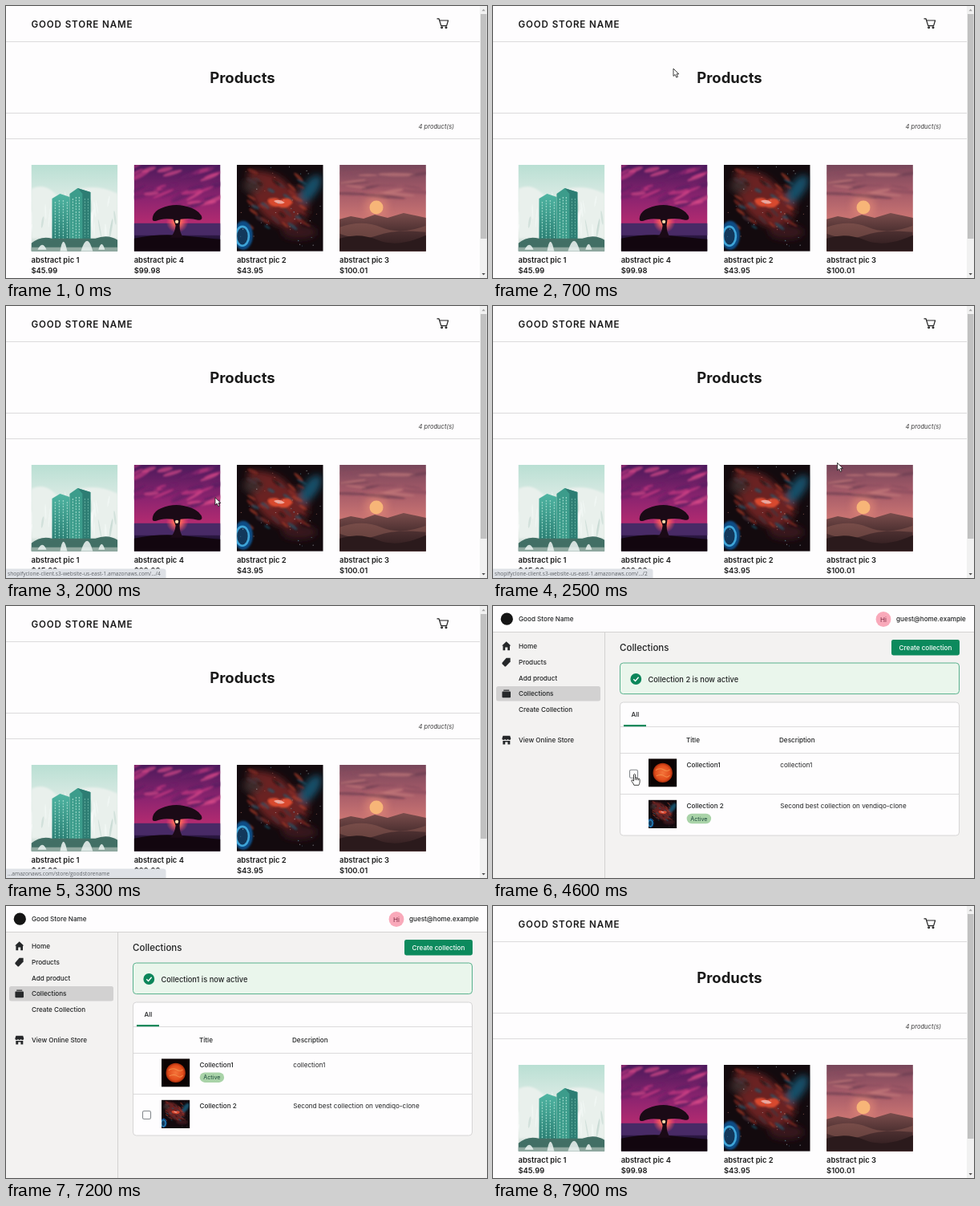
These frames come from a looping animation (600 px wide and 339 px high, 8000 ms). An HTML page:

```html
<!DOCTYPE html>
<html lang="en">
<head>
<meta charset="utf-8">
<title>Store and collections</title>
<style>
html, body { margin: 0; width: 100%; height: 100%; overflow: hidden; background: #fefdfe; }
svg#stage { display: block; width: 100vw; height: 100vh; }
text { font: 400 8.15px Inter, sans-serif; fill: #202223; white-space: pre; }
.m text, text.m { font-weight: 500; }
.shop { font-weight: 600; font-size: 9.4px; fill: #1a1a1a; }
#linkText { font: 6.65px "Open Sans", sans-serif; fill: #5f6368; }
.line { stroke: #dcdbdc; fill: none; }
.off { display: none; }
</style>
</head>
<body>
<svg id="stage" viewBox="0 0 600 339" preserveAspectRatio="none">
<defs>
  <linearGradient id="mint" x2="0" y2="1"><stop stop-color="#b9dfd3"/><stop offset=".4" stop-color="#dcebe5"/><stop offset="1" stop-color="#d3ded8"/></linearGradient>
  <linearGradient id="tower" x2="0" y2="1"><stop stop-color="#4fb5a2"/><stop offset="1" stop-color="#2b7f74"/></linearGradient>
  <linearGradient id="violet" x2="0" y2="1"><stop stop-color="#4b1a5b"/><stop offset=".4" stop-color="#8e2470"/><stop offset=".68" stop-color="#b32b70"/><stop offset=".69" stop-color="#4a2a68"/><stop offset=".85" stop-color="#25143a"/><stop offset="1" stop-color="#12081a"/></linearGradient>
  <linearGradient id="dusk" x2="0" y2="1"><stop stop-color="#77465a"/><stop offset=".3" stop-color="#a35a68"/><stop offset=".6" stop-color="#c87372"/></linearGradient>
  <linearGradient id="land" x2="0" y2="1"><stop stop-color="#7a4d4c"/><stop offset=".5" stop-color="#4b2f30"/><stop offset="1" stop-color="#2a191b"/></linearGradient>
  <radialGradient id="glow"><stop stop-color="#ffe0b0"/><stop offset=".3" stop-color="#ff6a58"/><stop offset="1" stop-color="#ff4a6a" stop-opacity="0"/></radialGradient>
  <radialGradient id="sun"><stop stop-color="#f4743a"/><stop offset=".75" stop-color="#e24d1c"/><stop offset="1" stop-color="#a42c0c"/></radialGradient>
  <filter id="soft" x="-50%" y="-50%" width="200%" height="200%"><feGaussianBlur stdDeviation="1.2"/></filter>
  <filter id="haze" x="-50%" y="-50%" width="200%" height="200%"><feGaussianBlur stdDeviation="4"/></filter>

  <symbol id="pic1" viewBox="0 0 108 108">
    <rect width="108" height="108" fill="url(#mint)"/>
    <path d="M0 30Q16 22 30 36T60 30Q84 24 108 36V92H0Z" fill="#e9f0ec" filter="url(#soft)"/>
    <g id="falls"/>
    <path d="M26 94V42L36 36L48 40V94Z" fill="url(#tower)"/>
    <path d="M48 94V36L58 29L74 34V94Z" fill="#3c9c8b"/>
    <path d="M58 29L74 34V94H64V36Z" fill="#2d7d73"/>
    <path d="M30 46V92M35 44V92M40 44V92M45 46V92M52 42V92M56 40V92M60 40V92" stroke="#94d3c4" stroke-width="1.3" stroke-dasharray="2 1.6"/>
    <path d="M67 42V90M71 42V90" stroke="#6cb5a6" stroke-dasharray="2 1.6"/>
    <path d="M0 98Q12 88 26 92H80Q96 86 108 94V108H0Z" fill="#426f65"/>
    <path d="M0 103H108V108H0Z" fill="#8fa89f"/>
    <path d="M36 108Q40 84 45 108M62 108Q70 82 77 108M8 106Q14 94 19 106M84 106Q88 92 92 106" fill="#eef5f2" opacity=".85"/>
  </symbol>

  <symbol id="pic4" viewBox="0 0 108 108">
    <rect width="108" height="108" fill="url(#violet)"/>
    <g id="clouds" filter="url(#soft)"/>
    <path d="M0 73H108V88H0Z" fill="#482a66"/>
    <path d="M0 92Q30 86 54 88T108 93V108H0Z" fill="#12060f"/>
    <circle cx="54" cy="71" r="14" fill="url(#glow)"/>
    <path d="M23 67Q24 58 34 54Q48 48 62 51Q78 54 84 63Q87 69 80 69Q70 66 58 68L57 76Q57 86 62 91H45Q51 86 52 76L49 68Q36 66 28 70Q23 71 23 67Z" fill="#1b0a16"/>
    <circle cx="53.5" cy="71" r="2.2" fill="#ffd9a8"/>
  </symbol>

  <symbol id="pic2" viewBox="0 0 108 108">
    <rect width="108" height="108" fill="#130a0e"/>
    <g filter="url(#haze)">
      <path d="M14 8Q52 6 66 28Q96 36 88 62Q66 88 42 70Q16 54 14 8Z" fill="#6a2420"/>
      <ellipse cx="92" cy="30" rx="9" ry="20" fill="#155069" transform="rotate(35 92 30)"/>
      <ellipse cx="20" cy="26" rx="12" ry="9" fill="#3b2a2b"/>
      <ellipse cx="78" cy="84" rx="22" ry="9" fill="#38181a"/>
    </g>
    <g id="dust" filter="url(#soft)"/>
    <path d="M38 44Q48 38 54 44Q66 38 70 47Q62 57 52 52Q42 54 38 44Z" fill="#d8482f" filter="url(#soft)"/>
    <path d="M46 45Q54 42 60 47Q54 51 46 45Z" fill="#f0a59a"/>
    <ellipse cx="8" cy="88" rx="12" ry="18" fill="#0d4d86" filter="url(#soft)"/>
    <ellipse cx="7" cy="89" rx="8" ry="12" fill="#12385c" stroke="#3fa5d8" stroke-width="2.6"/>
    <g id="stars"/>
  </symbol>

  <symbol id="pic3" viewBox="0 0 108 108">
    <rect width="108" height="108" fill="url(#dusk)"/>
    <g id="bands" filter="url(#soft)"/>
    <circle cx="46" cy="52" r="15" fill="#e88d78" opacity=".5" filter="url(#haze)"/>
    <circle cx="46" cy="53" r="8.5" fill="#f7b578"/>
    <path d="M0 68L14 64L30 67L44 62L60 66L80 60L108 66V108H0Z" fill="url(#land)"/>
    <path d="M0 78Q28 68 52 78T108 76V84Q70 80 48 88T0 86Z" fill="#8b5a53" opacity=".55"/>
    <path d="M0 92Q24 84 48 94T108 88V108H0Z" fill="#2b1a1c"/>
  </symbol>

  <symbol id="disc" viewBox="0 0 36 36">
    <rect width="36" height="36" fill="#0b0303"/>
    <circle cx="18" cy="18" r="12.4" fill="url(#sun)"/>
    <path d="M9 15Q14 11 19 14T27 14M10 22Q16 19 20 22T27 21" stroke="#f79a52" stroke-width="1.1" fill="none" opacity=".7"/>
  </symbol>
</defs>

<g id="store">
  <rect width="600" height="339" fill="#fefdfe"/>
  <text x="31.5" y="26.8" style="font-weight:600;font-size:11.6px;letter-spacing:.87px;fill:#1a1a1a">GOOD STORE NAME</text>
  <g fill="none" stroke="#222" stroke-width="1.2" stroke-linejoin="round">
    <path d="M537.5 15.8H540L542.8 24.6H549.6L551.6 18H541"/>
    <circle cx="543.6" cy="26.8" r=".9"/><circle cx="549" cy="26.8" r=".9"/>
  </g>
  <path class="line" d="M0 44.5H591M0 133.5H591M0 165.5H591"/>
  <text x="295" y="96" text-anchor="middle" style="font-weight:700;font-size:18.5px;fill:#1a1a1a">Products</text>
  <text x="559" y="152.6" text-anchor="end" style="font-style:italic;font-size:7.6px;fill:#3c3c3c">4 product(s)</text>
  <g id="products"/>
  <rect x="591" width="9" height="339" fill="#f1f1f1"/>
  <rect x="592" y="10" width="7.5" height="280" fill="#c1c1c1"/>
  <path d="M593.5 6.3L595.7 3.8L597.9 6.3Z" fill="#a3a3a3"/>
  <path d="M593.5 333L595.7 335.5L597.9 333Z" fill="#505050"/>
  <g id="link">
    <path d="M0 327.5H196.5Q199.5 327.5 199.5 330.5V339H0Z" fill="#dee1e6"/>
    <text id="linkText" x="2" y="336"/>
  </g>
</g>

<g id="admin">
  <rect width="600" height="339" fill="#f3f2f1"/>
  <rect width="600" height="32" fill="#fefdfe"/>
  <path d="M0 32.5H600M139.5 33V339" stroke="#d3d2d1"/>
  <circle cx="17.3" cy="16.2" r="7.6" fill="#151515"/>
  <rect x="4" y="100" width="130" height="18.5" rx="2.5" fill="#d2d1d1"/>
  <g id="nav" class="m"/>
  <g fill="#26282a">
    <path d="M16.7 44.3L22.3 49.6H21V55.2H18.2V51.6H15.2V55.2H12.4V49.6H11.1Z"/>
    <path d="M16.6 64.7H21.6V69.6L16 75.2Q15.2 75.8 14.5 75.2L11.6 72.3Q10.9 71.4 11.6 70.5Z"/>
    <path d="M13.2 104.6H20.2V105.7H13.2ZM12.2 106.6H21.2Q22 106.6 22 107.4V113.2Q22 114.2 21 114.2H12.4Q11.4 114.2 11.4 113.2V107.4Q11.4 106.6 12.2 106.6Z"/>
    <path d="M12.4 161.8H21.2L22.3 165.2Q22.3 166.8 20.6 167Q19.2 167 18.6 166Q16.8 168 15 166Q14.4 167 13 167Q11.3 166.8 11.3 165.2ZM12.3 168H21.3V172.4H18.4V169.4H15.2V172.4H12.3Z"/>
  </g>
  <circle cx="487" cy="16.5" r="9.4" fill="#f9a9ba"/>
  <text x="487" y="19.5" text-anchor="middle" style="fill:#7c2940">Hi</text>
  <text class="m" x="503" y="19.3">guest@home.example</text>
  <text class="m" x="158" y="55.8" style="font-size:11.5px">Collections</text>
  <rect x="497" y="42" width="85" height="19.5" rx="2.4" fill="#0c8a5d"/>
  <text class="m" x="539.5" y="54.7" text-anchor="middle" style="fill:#fff">Create collection</text>

  <rect x="158.5" y="71" width="423" height="38.6" rx="4" fill="#eaf6ec" stroke="#58b18d"/>
  <circle cx="178.3" cy="91" r="6.9" fill="#0b865a"/>
  <path d="M175.3 91.2L177.6 93.4L181.6 88.8" stroke="#fff" stroke-width="1.4" fill="none"/>
  <text class="m" id="notice" x="193.5" y="94.5" style="font-size:9.25px"/>

  <rect x="158.5" y="120" width="423" height="166" rx="4" fill="#fefdfe" stroke="#d6d5d5"/>
  <path class="line" d="M159 150.5H581M159 183.5H581M159 234.5H581"/>
  <text class="m" x="172.5" y="137.6">All</text>
  <rect x="163" y="148" width="28" height="2.2" fill="#0b8a5c"/>
  <g id="heads" class="m"><text x="241" y="170.4">Title</text><text x="357" y="170.4">Description</text></g>
  <g id="bulk" class="m">
    <rect x="167.5" y="156.5" width="118" height="22" rx="2.5" fill="#fff" stroke="#bcc0c3"/>
    <path d="M233.5 157V178" stroke="#bcc0c3"/>
    <rect x="172" y="162.5" width="10" height="10" rx="2" fill="#0b865a"/>
    <path d="M174.5 167.5H179.5" stroke="#fff" stroke-width="1.4"/>
    <text x="187" y="170.4">1 selected</text><text x="259.5" y="170.4" text-anchor="middle">Set active</text>
  </g>
  <use href="#disc" x="194" y="190.2" width="35.4" height="35.4"/>
  <use href="#pic2" x="194" y="241.6" width="35.4" height="35.4"/>
  <text class="m" x="241.6" y="201">Collection1</text><text x="358.3" y="201">collection1</text>
  <text class="m" x="241.6" y="252.3">Collection 2</text><text x="358.3" y="252.3">Second best collection on vendiqo-clone</text>
  <g id="badge">
    <rect x="241.7" y="258.8" width="30.4" height="12.4" rx="6.2" fill="#a9d3a8"/>
    <text x="256.9" y="267.6" text-anchor="middle" style="font-size:7.2px;fill:#1d4a3c">Active</text>
  </g>
  <g id="check">
    <rect id="box" x="170.5" y="204.2" width="10" height="10" rx="1.8" stroke="#85898d" stroke-width="1.1"/>
    <path id="tick" d="M172.8 209.3L174.7 211.2L178.4 207" stroke="#fff" stroke-width="1.4" fill="none"/>
  </g>
</g>

<g id="pointer" fill="#fff" stroke="#111" stroke-width=".8" stroke-linejoin="round">
  <path id="arrow" d="M0 0V9.4L2.2 7.4L3.8 11L5.5 10.3L4 6.8H6.9Z"/>
  <path id="hand" d="M-1 .8Q0 -.7 1.1 .8V5Q2.4 4.2 3 5.4Q4.4 4.6 4.9 6Q6.5 5.4 6.6 7.2V10Q6.4 12 5.4 14H-.6Q-1.4 11.6 -3.6 9Q-4 7.5 -2.6 7.4L-1 8.8ZM1.1 5V7.6M3 5.4V7.8M4.9 6V8"/>
</g>
</svg>

<script>
const LOOP = 8000, STEP = 100;
const $ = id => document.getElementById(id);
const show = (id, on) => $(id).classList.toggle('off', !on);
const within = (t, spans) => spans.some(([a, b]) => t >= a && t < b);

let seed = 7;
const rnd = (a, b) => {
  seed = (seed * 16807) % 2147483647;
  return a + (b - a) * seed / 2147483647;
};

// Fills a group with random ellipses inside x, y, w, h.
function scatter(id, n, [x, y, w, h], [rx, ry], colors, tilt = 0) {
  let out = '';
  for (let i = 0; i < n; i++) {
    const cx = rnd(x, x + w).toFixed(1), cy = rnd(y, y + h).toFixed(1);
    out += `<ellipse cx="${cx}" cy="${cy}" rx="${rnd(rx / 2, rx).toFixed(1)}" ry="${rnd(ry / 2, ry).toFixed(1)}"
      fill="${colors[i % colors.length]}" opacity=".6" transform="rotate(${rnd(tilt - 12, tilt + 12).toFixed(0)} ${cx} ${cy})"/>`;
  }
  $(id).innerHTML = out;
}
scatter('falls', 34, [0, 40, 108, 46], [1.4, 14], ['#fff', '#c4d8d0', '#f6faf8']);
scatter('clouds', 36, [0, 2, 108, 50], [15, 3], ['#cf3a84', '#5a1c62', '#e2508c', '#6d2068'], -18);
scatter('dust', 46, [16, 8, 76, 70], [8, 2.6], ['#8e2e24', '#2a1012', '#b0402c', '#46333a', '#1d5a70'], 35);
scatter('stars', 40, [2, 2, 104, 104], [.8, .8], ['#d8e6ee', '#e89a80', '#6db4d8']);
scatter('bands', 18, [0, 4, 108, 44], [24, 2.4], ['#8a4c5e', '#c47a7a', '#6b3c50']);

const products = [['1', '45.99'], ['4', '99.98'], ['2', '43.95'], ['3', '100.01']];
$('products').innerHTML = products.map(([n, price], i) => {
  const x = 31.5 + 128.2 * i;
  return `<use href="#pic${n}" x="${x}" y="198" width="107.8" height="107.8"/>
    <text class="shop" x="${x}" y="320.4">abstract pic ${n}</text>
    <text class="shop" x="${x}" y="333">$${price}</text>`;
}).join('');

const nav = [['Good Store Name', 19.2], ['Home', 53.3], ['Products', 73], ['Add product', 92.8],
  ['Collections', 112.4], ['Create Collection', 132.2], ['View Online Store', 169.6]];
$('nav').innerHTML = nav.map(([s, y]) => `<text x="32" y="${y}">${s}</text>`).join('');

// Pointer: time, x, y
const path = [
  [500, 232, -14], [900, 218, 170], [1400, 220.5, 200.5], [1600, 222, 232], [1900, 235, 240],
  [2200, 335, 235], [2500, 429.5, 195.5], [2700, 420, 176], [3000, 110, 24], [3200, 60, -14],
  [3900, 120, -14], [4500, 176.5, 209.3], [5200, 176.5, 209.3], [5700, 272.6, 167.6],
  [6500, 272.6, 167.6], [7200, 240, -14]
];
const handSpans = [[1450, 1850], [2050, 2350], [2900, 3050], [4400, 5300], [5600, 6100]];

const host = 'shopifyclone-client.s3-website-us-east-1.amazonaws.com/.../';
const links = [[1600, 2100, host + '4'], [2100, 2700, host + '2'],
  [3000, 3600, '...amazonaws.com/store/goodstorename']];

function pointerAt(t) {
  const i = path.findIndex(p => p[0] > t);
  if (i < 1) return path[i ? path.length - 1 : 0].slice(1);
  const [t0, x0, y0] = path[i - 1], [t1, x1, y1] = path[i];
  const k = (t - t0) / (t1 - t0), e = k * k * (3 - 2 * k);
  return [x0 + (x1 - x0) * e, y0 + (y1 - y0) * e];
}

function draw(t) {
  const admin = t >= 3800 && t < 7500;
  show('store', !admin);
  show('admin', admin);

  const link = links.find(([a, b]) => t >= a && t < b);
  show('link', link);
  $('linkText').textContent = link ? link[2] : '';

  const picked = t >= 4800 && t < 6100, swapped = t >= 6200;
  $('notice').textContent = `Collection${t < 6100 ? ' 2' : '1'} is now active`;
  show('heads', !picked);
  show('bulk', picked);
  show('tick', picked);
  $('box').setAttribute('fill', picked ? '#0b865a' : '#fefdfe');
  $('check').setAttribute('transform', `translate(0 ${swapped ? 51.3 : 0})`);
  $('badge').setAttribute('transform', `translate(0 ${swapped ? -51.3 : 0})`);

  const hand = within(t, handSpans);
  show('hand', hand);
  show('arrow', !hand);
  $('pointer').setAttribute('transform', `translate(${pointerAt(t)})`);
}

const start = performance.now();
function tick(now) {
  const t = Math.max(0, now - start) % LOOP;
  draw(Math.floor(t / STEP) * STEP);
  requestAnimationFrame(tick);
}
draw(0);
requestAnimationFrame(tick);
</script>
</body>
</html>
```
